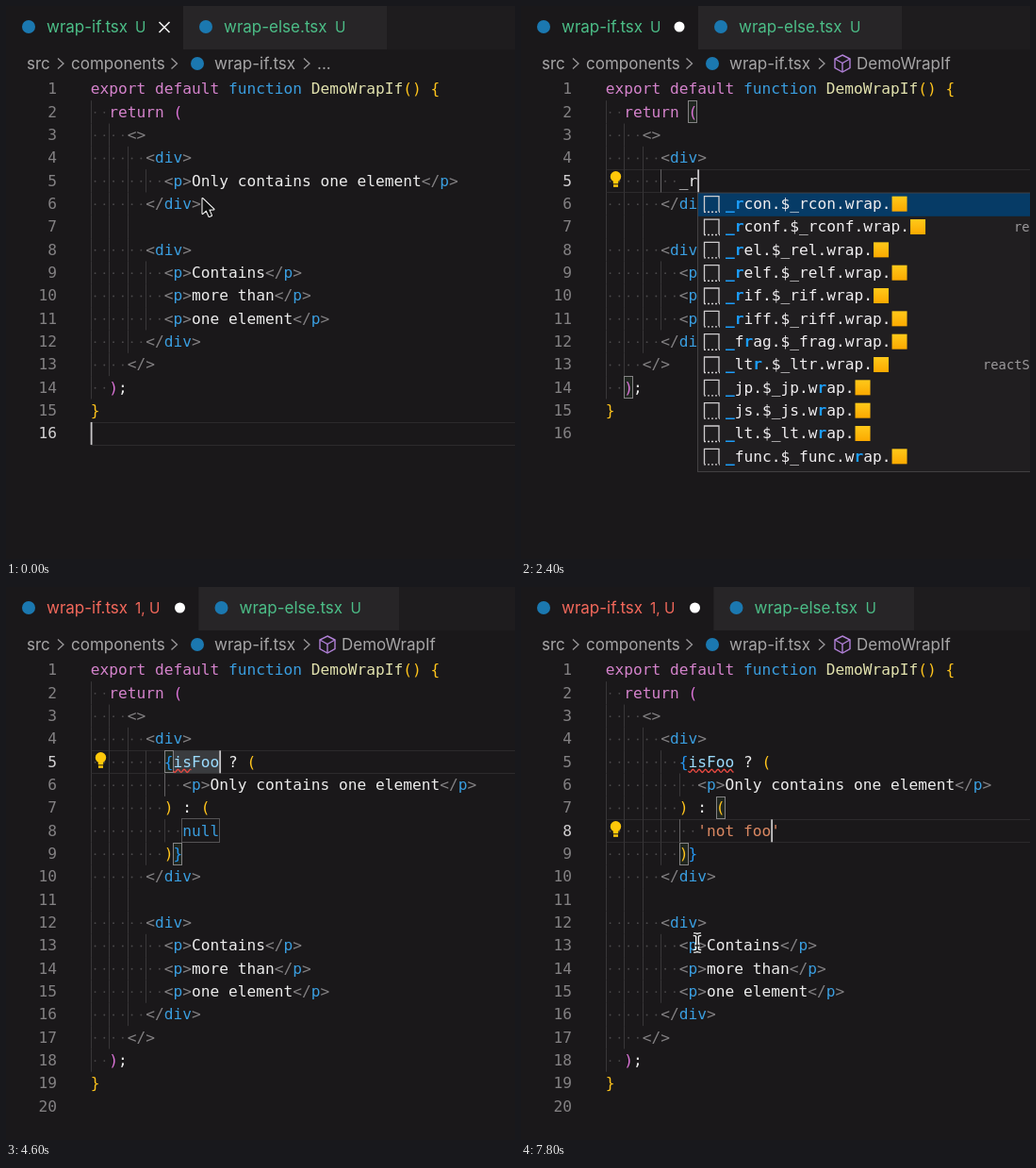
An HTML page with a canvas for the animation above (8 s loop, 540 by 586 pixels).

```html
<!DOCTYPE html>
<html lang="en">
<head>
<meta charset="utf-8">
<title>Wrap snippet demo</title>
<style>
html, body { margin: 0; width: 100%; height: 100%; overflow: hidden; background: #1a181a; }
canvas { display: block; width: 540px; height: 586px; }
</style>
</head>
<body>
<canvas id="stage" width="540" height="586"></canvas>
<script>
const ctx = document.getElementById('stage').getContext('2d');
const LOOP = 8000, STEP = 200;
const X0 = 89.7, Y0 = 88, CW = 9.753, LH = 24.33, BASE = 5.4;
const MONO = '16.2px "DejaVu Sans Mono", monospace';
const UI = '17px Inter, sans-serif';
const C = {
  bg: '#1a181a', pink: '#d583cc', blue: '#3a9ee0', fn: '#e2e2ae', tag: '#838183',
  text: '#ececec', name: '#9cdcfe', string: '#db8862', green: '#4cbd87', red: '#f2685b',
  icon: '#1b78b0', crumb: '#a6a5a6', guide: '#393739', active: '#636163'
};
const BRACKETS = ['#ffc41c', '#dc74d8', '#2597f2'];
const SNIPPETS = 'rcon rconf rel relf rif riff frag ltr jp js lt func'.split(' ');
const DETAILS = { rconf: [523, 're'], ltr: [490, 'reactS'] };

const colX = c => X0 + c * CW;
const rowY = n => Y0 + (n - 1) * LH;

function rect(x, y, w, h, color) {
  ctx.fillStyle = color;
  ctx.fillRect(x, y, w, h);
}
function box(x, y, w, h, color) {
  ctx.strokeStyle = color;
  ctx.lineWidth = 1;
  ctx.strokeRect(Math.round(x) + 0.5, Math.round(y) + 0.5, w, h);
}
function round(x, y, w, h, r, color) {
  ctx.fillStyle = color;
  ctx.beginPath();
  ctx.roundRect(x, y, w, h, r);
  ctx.fill();
}
function disc(x, y, r, color) {
  ctx.fillStyle = color;
  ctx.beginPath();
  ctx.arc(x, y, r, 0, Math.PI * 2);
  ctx.fill();
}
function path(points, color, width, closed) {
  ctx.beginPath();
  points.forEach(([x, y]) => ctx.lineTo(x, y));
  if (closed) ctx.closePath();
  ctx.strokeStyle = color;
  ctx.lineWidth = width;
  ctx.stroke();
}
function write(str, x, y, color, font, align = 'left') {
  ctx.font = font;
  ctx.fillStyle = color;
  ctx.textAlign = align;
  ctx.fillText(str, x, y);
}

// Part of a string typed at time t, one character per step
const typed = (str, t, start) => str.slice(0, Math.max(0, Math.floor((t - start) / STEP) + 1));

function documentAt(t) {
  const p = '<p>Only contains one element</p>';
  let body;
  if (t < 2200) body = ['        ' + p];
  else if (t < 3000) body = ['        ' + typed('_rif', t, 2200)];
  else {
    const cond = t < 3800 ? 'condition' : typed('isFoo', t, 3800);
    let alt = 'null';
    if (t >= 5400) alt = "'" + (t < 6200 ? typed('not', t, 5600) : 'not ' + typed('foo', t, 6200)) + "'";
    body = [`        {${cond} ? (`, '          ' + p, '        ) : (', '          ' + alt, '        )}'];
  }
  return ['export default function DemoWrapIf() {', '  return (', '    <>', '      <div>',
    ...body, '      </div>', '', '      <div>', '        <p>Contains</p>',
    '        <p>more than</p>', '        <p>one element</p>', '      </div>',
    '    </>', '  );', '}', ''];
}

function stateAt(t) {
  const s = { lines: documentAt(t), line: 5, caret: null, sel: null, slot: null, marks: [], bulb: 0, guide: null };
  const len = s.lines[4].length;
  if (t < 400) { s.line = 16; s.caret = 0; }
  else if (t < 2200) {
    const end = Math.round(8 + 32 * Math.min(1, (t - 400) / 600));
    if (end > 8) s.sel = [8, end, '#0e4372'];
    else s.caret = 8;
    s.guide = [6, 5];
    s.bulb = t >= 1200 ? 5 : 0;
  } else if (t < 3000) {
    s.caret = len;
    s.bulb = 5;
    s.guide = [6, 5];
    s.marks = [[2, 9], [14, 2]];
  } else if (t < 5000) {
    s.bulb = 5;
    s.guide = [8, 6];
    if (t < 3800) {
      s.sel = [9, 18, '#264d6e'];
      s.caret = 18;
      s.marks = t < 3200 ? [[2, 9], [18, 2]] : [];
    } else {
      s.caret = len - 4;
      s.slot = [9, s.caret, '#3a3c3f'];
      s.marks = [[5, 8], [9, 9]];
    }
  } else {
    s.line = 8;
    s.bulb = 8;
    s.guide = [8, 8];
    s.marks = [[7, 12], [9, 8]];
    s.caret = t < 5400 ? 14 : s.lines[7].length - 1;
    if (t < 5400) s.sel = [10, 14, '#264d6e'];
  }
  s.error = t >= 4400;
  s.dirty = t >= 2200;
  s.blink = t < 6600 || (t - 6600) % 1000 < 500;
  s.squiggle = t < 4400 ? 0 : t < 4800 ? 2 : 5;
  return s;
}

function drawTabs(s) {
  const shift = s.error ? 16.5 : 0;
  const edge = 188 + shift, end = s.error ? 417 : 404;
  rect(0, 0, 540, 46, '#1e1c1e');
  rect(0, 0, edge, 46, C.bg);
  rect(edge, 0, end - edge, 46, '#272527');
  const first = s.error ? C.red : C.green;
  const small = '15.3px Inter, sans-serif';
  const base = 28;
  disc(24, 22, 7, C.icon);
  write('wrap-if.tsx', 43, base, first, UI);
  write(s.error ? '1, U' : 'U', 137, base, first, small);
  if (s.dirty) disc(168 + shift, 22, 5.5, '#fff');
  else {
    path([[162.5, 17], [173.5, 28]], '#f2f2f2', 1.6);
    path([[173.5, 17], [162.5, 28]], '#f2f2f2', 1.6);
  }
  disc(212 + shift, 22, 7, C.icon);
  write('wrap-else.tsx', 231 + shift, base, C.green, UI);
  write('U', 349 + shift, base, C.green, small);
}

function drawCrumbs(full) {
  const put = (str, x) => write(str, x, 67, C.crumb, UI);
  put('src', 22);
  put('components', 69);
  disc(203, 61, 7, C.icon);
  put('wrap-if.tsx', 221);
  for (const x of [58, 178.5, 319]) path([[x - 3, 55.5], [x + 3, 61], [x - 3, 66.5]], '#9a989a', 1.3);
  if (!full) return put('...', 330);
  const purple = '#b180d7';
  path([[341, 52], [349, 56], [349, 65.5], [341, 70], [333, 65.5], [333, 56]], purple, 1.4, true);
  path([[333, 56], [341, 60.5], [349, 56]], purple, 1.4);
  path([[341, 60.5], [341, 70]], purple, 1.4);
  put('DemoWrapIf', 356);
}

function drawGuides(lines, guide) {
  lines.forEach((line, i) => {
    const last = i === lines.length - 1;
    const indent = line ? line.search(/\S/) : last ? 0 : 6;
    const y = rowY(i + 1);
    for (let c = 0; c < indent; c += 2) {
      const on = guide && guide[0] === c && guide[1] === i + 1;
      rect(Math.round(colX(c)), y - LH / 2, 1, LH, on ? C.active : C.guide);
    }
    if (line) for (let c = 0; c < indent; c++) disc(colX(c + 0.5), y + 0.5, 0.95, '#4b494b');
  });
}

function drawCode(lines, active) {
  let depth = 0;
  lines.forEach((line, i) => {
    const y = rowY(i + 1) + BASE;
    write(String(i + 1), 54, y, i + 1 === active ? '#d2d0d2' : '#838183', MONO, 'right');
    let prev = '', col = 0;
    for (const tok of line.match(/'[^']*'|<\/?|\w+|\s+|./g) || []) {
      let color = C.text;
      if (/^[({]$/.test(tok)) color = BRACKETS[depth++ % 3];
      else if (/^[)}]$/.test(tok)) color = BRACKETS[--depth % 3];
      else if (/^[<>]/.test(tok)) color = C.tag;
      else if (tok[0] === "'") color = C.string;
      else if (prev[0] === '<' || /^(function|null)$/.test(tok)) color = C.blue;
      else if (/^(export|default|return)$/.test(tok)) color = C.pink;
      else if (tok === 'DemoWrapIf') color = C.fn;
      else if (prev === '{') color = C.name;
      if (tok.trim()) write(tok, colX(col), y, color, MONO);
      col += tok.length;
      prev = tok;
    }
  });
}

function drawBulb(line) {
  const y = rowY(line) - 2;
  disc(100.5, y - 2.5, 5.7, '#ffc80a');
  rect(97.8, y, 5.4, 5, '#ffc80a');
  rect(98, y + 6, 5, 2.5, '#ffc80a');
}

function drawSquiggle(chars) {
  const points = [];
  for (let x = 0; x <= chars * CW; x++) points.push([colX(9) + x, rowY(5) + 9.5 + 1.6 * Math.sin(x * 0.95)]);
  path(points, '#ec4a42', 1.3);
}

// Indices of the letters matched in order, or null
function fuzzy(label, query) {
  const hits = [];
  for (const ch of query) {
    const at = label.indexOf(ch, hits.length ? hits[hits.length - 1] + 1 : 0);
    if (at < 0) return null;
    hits.push(at);
  }
  return hits;
}

function drawPopup(query) {
  const rows = SNIPPETS.map(key => ({ key, label: `_${key}.$_${key}.wrap.` }))
    .map(r => ({ ...r, hits: fuzzy(r.label, query) })).filter(r => r.hits);
  const h = rows.length * LH + 4;
  rect(187, 198, 360, h, '#201e20');
  box(187, 198, 360, h - 1, '#434143');
  rows.forEach(({ key, label, hits }, i) => {
    const y = 209.7 + i * LH;
    if (!i) rect(188, 198.5, 352, LH, '#063b66');
    path([[194.5, y + 8], [194.5, y - 8], [210, y - 8], [210, y + 8]], '#cfcdcf', 1.3);
    ctx.setLineDash([2, 2]);
    path([[194, y + 8.5], [211, y + 8.5]], '#cfcdcf', 1.4);
    ctx.setLineDash([]);
    [...label].forEach((ch, j) => {
      const hit = hits.includes(j);
      write(ch, 217 + j * CW, y + BASE, hit ? '#1c9dfa' : '#f0eef0', (hit ? 'bold ' : '') + MONO);
    });
    const x = 217 + label.length * CW;
    const shade = ctx.createLinearGradient(x, y - 8, x, y + 8);
    shade.addColorStop(0, '#ffc91a');
    shade.addColorStop(1, '#fba900');
    rect(x + 1, y - 8, 16, 16, shade);
    const detail = DETAILS[key];
    if (detail) write(detail[1], detail[0], y + 5, '#9b999b', '13.8px "DejaVu Sans Mono", monospace');
  });
}

function drawArrow(x, y) {
  ctx.lineJoin = 'round';
  path([[x, y], [x, y + 16], [x + 4, y + 12.5], [x + 7, y + 19], [x + 9.5, y + 18],
    [x + 6.8, y + 11.8], [x + 12, y + 11.5]], '#fff', 2, true);
  ctx.fillStyle = '#111';
  ctx.fill();
  ctx.lineJoin = 'miter';
}

function drawBeam(x, y) {
  for (const [color, w] of [['#fff', 4], ['#111', 1.4]]) {
    path([[x - 4, y - 9], [x - 1, y - 8.5], [x, y - 7], [x, y + 7], [x - 1, y + 8.5], [x - 4, y + 9]], color, w);
    path([[x + 4, y - 9], [x + 1, y - 8.5], [x, y - 7]], color, w);
    path([[x + 4, y + 9], [x + 1, y + 8.5], [x, y + 7]], color, w);
    path([[x - 2.5, y + 3], [x + 2.5, y + 3]], color, w);
  }
}

function drawPointer(t) {
  if (t < 200) drawArrow(208.5, 204);
  else if (t < 400) drawBeam(188, 195);
  else if (t < 1600) drawBeam(168 + 312 * Math.min(1, (t - 400) / 600), 186);
  else if (t >= 7400) {
    const k = (t - 7400) / 400, ease = k * (2 - k);
    drawBeam(478 - 291 * ease, 258 + 119 * ease);
  }
}

function draw(t) {
  const s = stateAt(t);
  rect(0, 0, 540, 586, C.bg);
  drawTabs(s);
  drawCrumbs(t >= 600);
  const y = rowY(s.line);
  if (!s.sel) {
    rect(90, Math.round(y - 12), 450, 1, '#2c2a2c');
    rect(90, Math.round(y + 12), 450, 1, '#2c2a2c');
  }
  const fill = s.sel || s.slot;
  if (fill) round(colX(fill[0]), y - LH / 2, (fill[1] - fill[0]) * CW, LH, s.sel ? 3 : 0, fill[2]);
  drawGuides(s.lines, s.guide);
  for (const [line, col] of s.marks) {
    rect(colX(col), rowY(line) - 12, CW, 24, '#202620');
    box(colX(col), rowY(line) - 12, 9, 23, '#858385');
  }
  if (t >= 3000 && t < 5000) box(colX(10) - 1, rowY(8) - 13, 40, 25, '#555355');
  drawCode(s.lines, s.line);
  if (s.squiggle) drawSquiggle(s.squiggle);
  if (s.bulb) drawBulb(s.bulb);
  if (s.caret !== null && s.blink) rect(colX(s.caret), y - 12, 1.8, 24, '#c9c7c9');
  if (t >= 2400 && t < 3000) drawPopup(typed('_rif', t, 2200));
  drawPointer(t);
}

function tick(now) {
  draw(Math.floor((now % LOOP) / STEP) * STEP);
  requestAnimationFrame(tick);
}
draw(0);
requestAnimationFrame(tick);
</script>
</body>
</html>
```
